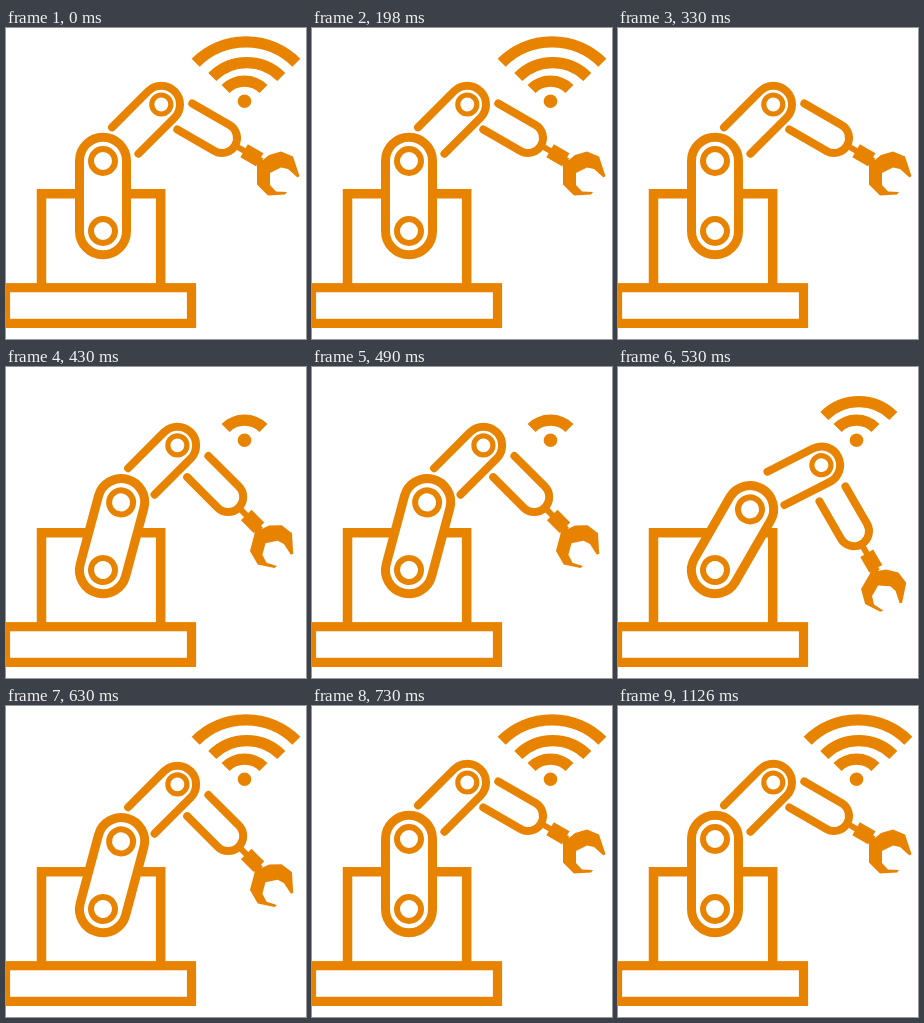
Animation of 300x311 px, one loop 1390 ms. Source, as an HTML page:

```html
<!DOCTYPE html>
<html lang="en">
<head>
<meta charset="utf-8">
<title>Robot arm</title>
<style>
  html, body { margin: 0; height: 100%; overflow: hidden; background: #fff; }
  svg { display: block; width: 100vw; height: 100vh; fill: none; stroke: #e88300; }
  .solid { fill: #e88300; stroke: none; }
  .arm { stroke-width: 8; stroke-linecap: round; }
</style>
</head>
<body>
<svg viewBox="0 0 300 311">
  <path d="M35.5 260V165.7H154.7V260" stroke-width="9.5"/>
  <rect x="-.5" y="259.7" width="186" height="35.7" stroke-width="9.2" fill="#fff"/>

  <!-- origin at the base pivot -->
  <g id="lower">
    <rect x="-23.5" y="-93.8" width="47" height="117.5" rx="23.5" stroke-width="9" fill="#fff"/>
    <g stroke-width="6"><circle r="12"/><circle cy="-70" r="12"/></g>
  </g>

  <!-- origin at the elbow -->
  <g id="upper">
    <path class="arm" d="M-51 -18.7H0A18.7 18.7 0 0 1 0 18.7H-51"/>
    <circle r="9.5" stroke-width="5.2"/>
  </g>

  <!-- origin at the centre of the rounded end -->
  <g id="fore">
    <g transform="rotate(30)">
      <path class="arm" d="M-43 -15H0A15 15 0 0 1 0 15H-43"/>
      <path d="M17 0H46" stroke-width="6"/>
      <rect class="solid" x="25.5" y="-7.5" width="18" height="15"/>
    </g>
    <path class="solid" d="M34 22L41 22L47 17L59 13.5L71 18.5L77.5 38L75.5 39.5L66 31L59 29.5L48 35
      L48 47L54 53.5L65 54L63 56.5L46 57.5L35 46.5L35 30Z"/>
  </g>

  <circle class="solid" cx="238.5" cy="73.3" r="6.8"/>
  <g id="waves" stroke-width="11.3"></g>
</svg>
<script>
const $ = id => document.getElementById(id);

// Quarter arcs, inner to outer: centre x, centre y, radius
const waves = [[238.5, 80, 26.8], [240.8, 83.5, 48.8], [240, 85, 71.2]];
$('waves').innerHTML = waves.map(([x, y, r]) => {
  const h = r * Math.SQRT1_2;
  return `<path d="M${x - h} ${y - h}A${r} ${r} 0 0 1 ${x + h} ${y - h}"/>`;
}).join('');
const dot = document.querySelector('svg > circle');

// Elbow and wrist positions with the upper arm's angle, from upright to bent
const poses = [
  { elbow: [155.3, 76.5], wrist: [216, 110], tilt: -45 },
  { elbow: [171.4, 78.4], wrist: [222.2, 130], tilt: -45 },
  { elbow: [203.4, 98.2], wrist: [236, 164.2], tilt: -27 }
];
const poseSteps = [0, 0, 1, 2, 1, 0];
const signalSteps = [4, 0, 2, 3, 4, 4];

const place = (id, [x, y], angle) =>
  $(id).setAttribute('transform', `translate(${x} ${y}) rotate(${angle})`);
const show = (el, on) => el.setAttribute('visibility', on ? 'visible' : 'hidden');

function draw(now) {
  const t = now % 1390;
  const step = t < 330 ? 0 : Math.min(5, 1 + Math.floor((t - 330) / 100));
  const bend = poseSteps[step], { elbow, wrist, tilt } = poses[bend];
  place('lower', [97, 203], bend * 15);
  place('upper', elbow, tilt);
  place('fore', wrist, bend * 15);
  [dot, ...$('waves').children].forEach((el, i) => show(el, i < signalSteps[step]));
}

const start = performance.now();
function loop() {
  draw(performance.now() - start);
  requestAnimationFrame(loop);
}
loop();
</script>
</body>
</html>
```
